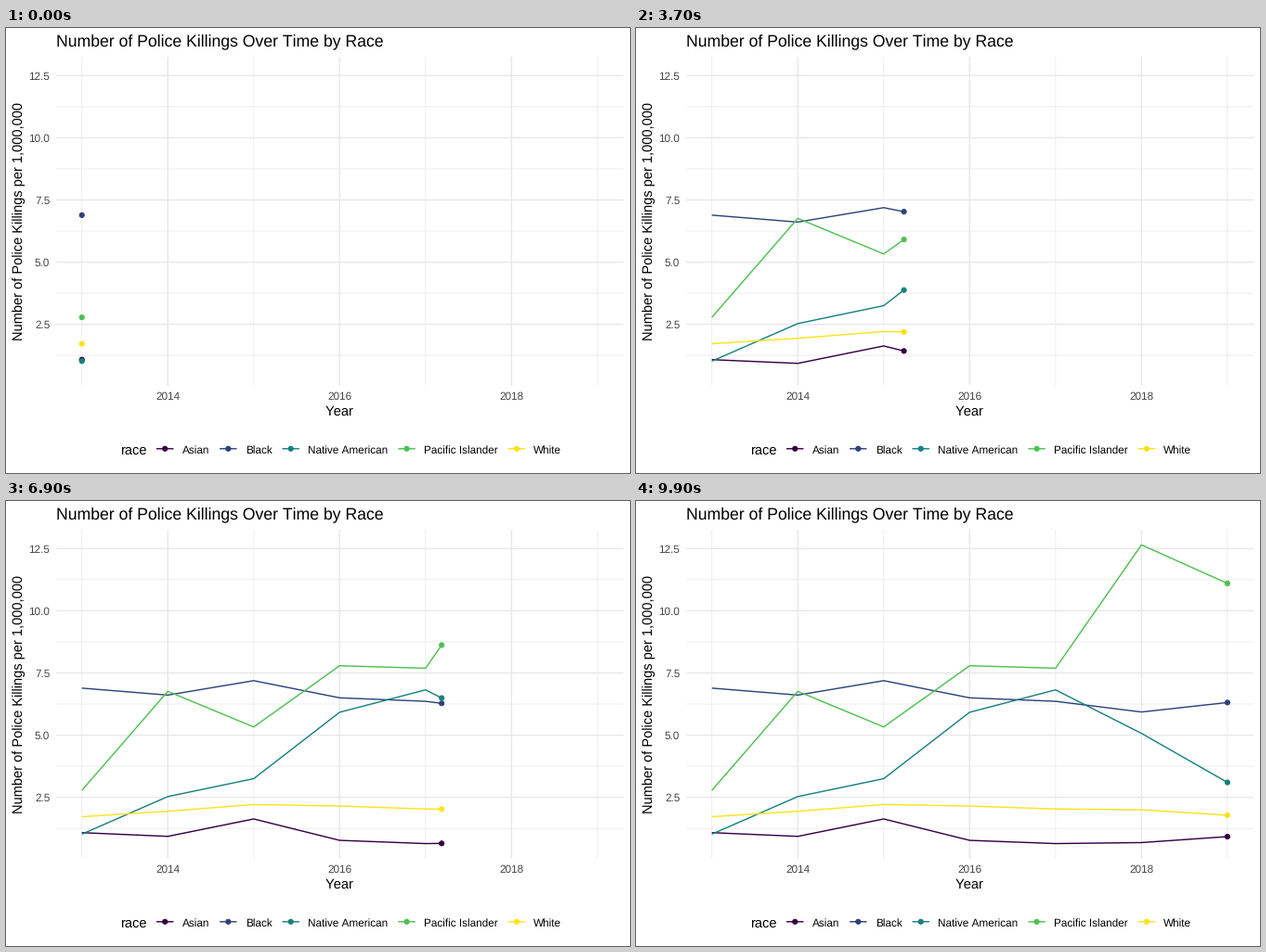
A matplotlib script that plays this animation: 672 px wide and 480 px high, repeating every 10 s.

```python
import matplotlib.pyplot as plt
import numpy as np
from matplotlib.animation import FuncAnimation

plt.rcParams.update({
    "font.family": "Liberation Sans",
    "text.hinting": "none",
    "text.kerning_factor": 6,  # plain advances, no pair kerning
    "path.snap": False,
    "toolbar": "None",
})

W, H, DPI = 672, 480, 96
FRAMES, INTERVAL = 100, 100
PX = 72 / DPI  # one pixel in points

LEFT, RIGHT, TOP, BOTTOM = 53.95, 664.67, 31.0, 385.5
UNIT, ZERO = 26.83, 386.7  # pixels per unit, pixel row of zero

YEARS = np.arange(2013, 2020)
ARRIVE = np.round(np.linspace(0, FRAMES - 1, len(YEARS)))

# yearly rate per million
RATES = {
    "Asian": [1.08, 0.93, 1.63, 0.77, 0.64, 0.68, 0.92],
    "Black": [6.89, 6.61, 7.19, 6.5, 6.36, 5.93, 6.31],
    "Native American": [1.02, 2.53, 3.25, 5.92, 6.82, 5.07, 3.1],
    "Pacific Islander": [2.78, 6.76, 5.33, 7.79, 7.69, 12.65, 11.1],
    "White": [1.72, 1.94, 2.21, 2.15, 2.03, 2.0, 1.78],
}
TABLE = np.array(list(RATES.values()))

# viridis, slightly deepened by a display gamma
COLORS = plt.cm.viridis(np.linspace(0, 1, len(RATES))) ** 1.2
GRID, TICK = "#E8E8E8", "#474747"

LINE = dict(lw=1.42 * PX, solid_capstyle="butt", solid_joinstyle="round")
DOT = dict(s=3.92 ** 2, linewidths=0.94 * PX, c=COLORS, edgecolors=COLORS,
           zorder=3)

fig = plt.figure(figsize=(W / DPI, H / DPI), dpi=DPI, facecolor="white")

page = fig.add_axes([0, 0, 1, 1])
page.set(xlim=(0, W), ylim=(H, 0))
page.axis("off")

panel = fig.add_axes([LEFT / W, 1 - BOTTOM / H,
                      (RIGHT - LEFT) / W, (BOTTOM - TOP) / H])
panel.set(xlim=(YEARS[0] - 0.3, YEARS[-1] + 0.3),
          ylim=((ZERO - BOTTOM) / UNIT, (ZERO - TOP) / UNIT))
panel.axis("off")


def label(x, y, text, size, color="black", ha="left", rotation=0):
    return page.text(x, y, text, fontsize=size, color=color, ha=ha,
                     va="baseline", rotation=rotation, rotation_mode="anchor")


def grid(xs, ys, width):
    style = dict(color=GRID, lw=width * PX, zorder=1)
    for x in xs:
        panel.axvline(x, **style)
    for y in ys:
        panel.axhline(y, **style)


def draw_scales():
    years, rates = YEARS[1::2], np.arange(2.5, 13, 2.5)
    grid(YEARS[::2], rates - 1.25, 0.71)
    grid(years, rates, 1.42)
    for year in years:
        x = np.interp(year, panel.get_xlim(), (LEFT, RIGHT))
        label(x, 401, str(year), 8.8, TICK, "center")
    for rate in rates:
        label(47.3, ZERO - rate * UNIT + 4.2, f"{rate:.1f}", 8.8, TICK,
              "right")


def draw_titles():
    label(LEFT, 19, "Number of Police Killings Over Time by Race", 13.2)
    label((LEFT + RIGHT) / 2, 418, "Year", 11, ha="center")
    label(18, (TOP + BOTTOM) / 2, "Number of Police Killings per 1,000,000",
          11, ha="center", rotation=90)


def draw_legend(x=171.2, y=453.8):
    label(123.4, 459.5, "race", 11)
    keys = []
    for name, color in zip(RATES, COLORS):
        page.plot([x - 9.2, x + 9.2], [y, y], color=color, **LINE)
        text = label(x + 18.5, 459, name, 8.8)
        keys.append(x)
        x += text.get_window_extent().width + 38.7
    page.scatter(keys, [y] * len(keys), **DOT)


draw_scales()
draw_titles()
draw_legend()

lines = [panel.plot([], [], color=c, zorder=2, **LINE)[0] for c in COLORS]
dots = panel.scatter(np.full(len(TABLE), YEARS[0]), TABLE[:, 0],
                     clip_on=False, **DOT)


def update(step):
    now = np.interp(step, ARRIVE, YEARS)
    past = YEARS < now
    xs = np.append(YEARS[past], now)
    heads = [np.interp(now, YEARS, rates) for rates in TABLE]
    for line, rates, head in zip(lines, TABLE, heads):
        line.set_data(xs, np.append(rates[past], head))
    dots.set_offsets([(now, head) for head in heads])
    return [*lines, dots]


anim = FuncAnimation(fig, update, frames=FRAMES, interval=INTERVAL,
                     init_func=lambda: update(0), repeat=True, repeat_delay=0)
plt.show()
```
